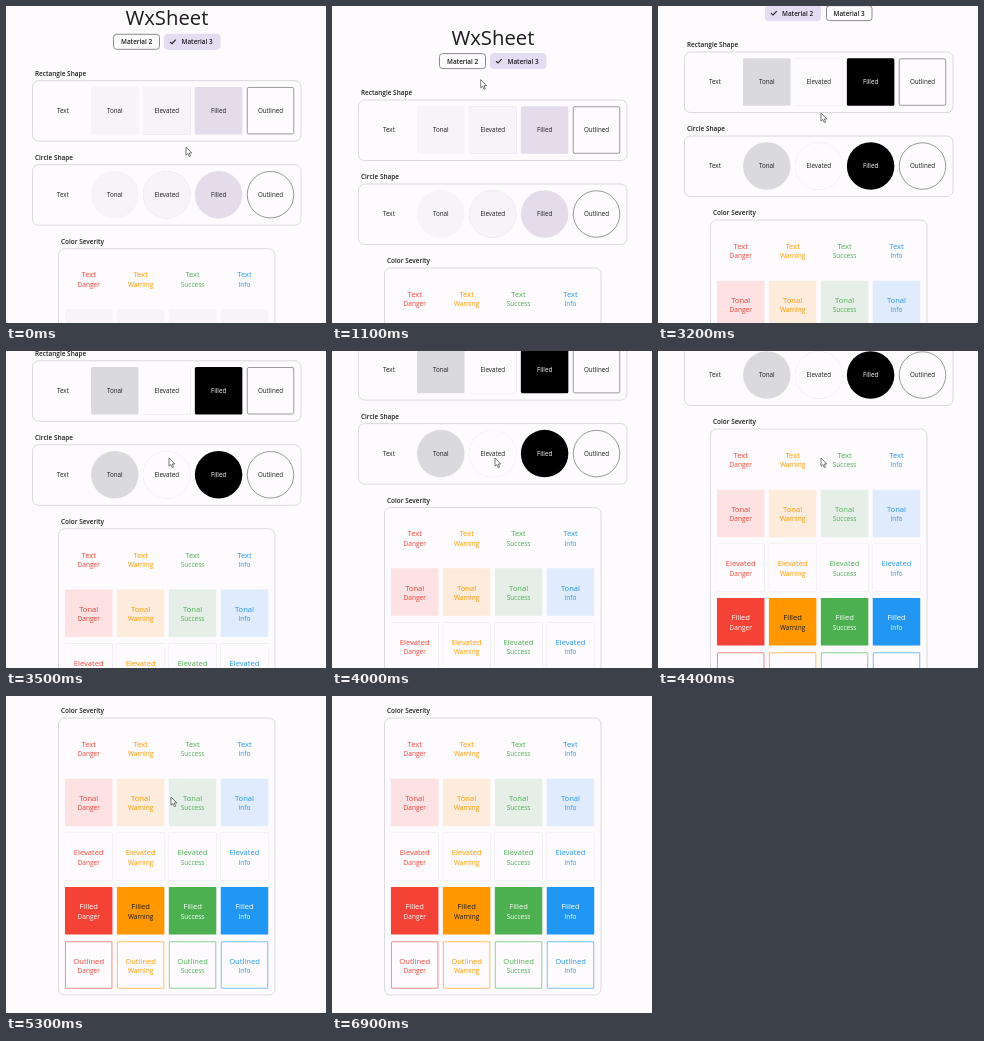
An HTML page that plays this animation: 320x317 px, repeating every 7.7 s.

```html
<!DOCTYPE html>
<html lang="en">
<head>
<meta charset="utf-8">
<title>WxSheet</title>
<style>
  html, body { margin: 0; width: 100%; height: 100%; overflow: hidden; background: #fdfbfe; }
  svg { display: block; width: 100%; height: 100%; font-family: "Open Sans", "Noto Sans", sans-serif; }
  .raised { filter: drop-shadow(0 .8px .5px #0003); }
  .outlined { stroke-opacity: .6; }
</style>
</head>
<body>
<svg id="stage" viewBox="0 0 320 317"></svg>
<script>
const LOOP = 7700, STEP = 100;
const INK = '#1c1b1f', PAGE = '#fdfbfe', LINE = '#5a575f', TONAL = '#f7f3f9';
const SIZE = 47.5;
const stage = document.getElementById('stage');

const clamp = x => Math.min(1, Math.max(0, x));
const lerp = (a, b, u) => a + (b - a) * u;
const span = (t, from, to) => clamp((t - from) / (to - from));
const smooth = u => u * u * (3 - 2 * u);
const decay = (t, k) => 1 - Math.exp(-t / k);

function mix(a, b, u) {
  const part = (c, i) => parseInt(c.slice(i, i + 2), 16);
  return `rgb(${[1, 3, 5].map(i => Math.round(lerp(part(a, i), part(b, i), u)))})`;
}

const text = (x, y, size, label, fill = INK, more = 'text-anchor="middle"') =>
  `<text x="${x}" y="${y}" font-size="${size}" fill="${fill}" ${more}>${label}</text>`;

const box = (x, y, w, h, r, fill, stroke = 'none', cls = '') =>
  `<rect x="${x}" y="${y}" width="${w}" height="${h}" rx="${r}" fill="${fill}" stroke="${stroke}" class="${cls}"/>`;

const panel = (x, y, w, h) => box(x, y, w, h, 6, 'none', '#dcd9df');

const heading = (x, y, label) => text(x, y, 6.45, label, INK, 'font-weight="600"');

// An outlined sheet keeps its stroke inside the edge.
function sheet(cx, cy, r, fill, stroke = 'none', cls = '') {
  const half = SIZE / 2 - (stroke === 'none' ? 0 : .5);
  return box(cx - half, cy - half, 2 * half, 2 * half, r, fill, stroke, cls);
}

function chip(x, right, label, selected, fill) {
  const look = selected ? [fill, fill] : [PAGE, '#8d8993'];
  const tick = selected
    ? `<path d="M${x + 6} 55.1l2 1.9 3.7-4" fill="none" stroke="${INK}" stroke-width="1.1"/>` : '';
  return box(x + .5, 47.6, right - x - 1, 15, 3, ...look) + tick +
    text(right - 23.4, 57.6, 6.4, label, INK, 'text-anchor="middle" font-weight="600"');
}

function shapes(cy, r, m) {
  const at = i => 56.9 + 51.9 * i;
  const looks = [
    ['none'],
    [mix(TONAL, '#dadadc', m)],
    [mix(TONAL, PAGE, m), 'none', 'raised'],
    [mix('#e4dcea', '#000000', m)],
    ['none', LINE, 'outlined']
  ];
  return ['Text', 'Tonal', 'Elevated', 'Filled', 'Outlined'].map((name, i) =>
    sheet(at(i), cy, r, ...looks[i]) +
    text(at(i), cy + 2.4, 6.25, name, i === 3 ? mix(INK, '#ffffff', m) : INK)).join('');
}

const severities = [
  ['Danger', '#f44336', '#fde1e3', '#ffffff'],
  ['Warning', '#ff9800', '#fdecdc', INK],
  ['Success', '#4caf50', '#e6efe7', '#ffffff'],
  ['Info', '#2196f3', '#e0ebfe', '#ffffff']
];

function severityGrid(m) {
  return severities.map(([name, color, tint, onColor], col) => {
    const cx = 82.7 + 51.93 * col;
    const rows = [
      ['Text', color, 'none'],
      ['Tonal', color, mix(TONAL, tint, m)],
      ['Elevated', color, PAGE, 'none', 'raised'],
      ['Filled', onColor, color],
      ['Outlined', color, 'none', color, 'outlined']
    ];
    return rows.map(([kind, ink, ...look], row) => {
      const cy = 292.2 + 54.2 * row;
      return sheet(cx, cy, .5, ...look) +
        text(cx, cy - 1.4, 7.6, kind, ink) + text(cx, cy + 8, 6.5, name, ink);
    }).join('');
  }).join('');
}

function scrollAt(t) {
  if (t < 3100) return 19.3 * (1 - smooth(span(t, 0, 400)));
  if (t < 3900) return 88 * decay(t - 3100, 127);
  if (t < 4000) return 88;
  if (t < 4400) return lerp(105.4, 184, span(t, 4000, 4400));
  return 184 + 56 * (t < 5300 ? decay(t - 4400, 220) : 1);
}

function pointerAt(t) {
  const move = (a, b, u) => [lerp(a[0], b[0], u), lerp(a[1], b[1], u)];
  const start = [180, 141], button = [141, 57], page = [163, 107], rest = [165, 101];
  if (t < 2400) return move(start, button, smooth(span(t, 600, 1300)));
  if (t < 4700) return move(button, page, smooth(span(t, 2400, 2700)));
  if (t < 6600) return move(page, rest, span(t, 4700, 5000));
  return t < 6900 ? move(rest, [303, 66], smooth(span(t, 6600, 6800))) : null;
}

function pointer(t) {
  const p = pointerAt(t);
  if (!p) return '';
  const hand = p[1] < 63;
  const d = hand
    ? 'M-1 1Q0-.2 1 1V4.6L4.4 5.4Q5.4 5.8 5.2 7L4.4 11H-.2L-3 7.4Q-2.6 6-1 7.2Z'
    : 'M0 0V8.2L1.9 6.5 3.3 9.7 4.6 9.1 3.2 6H5.8Z';
  return `<path transform="translate(${p})" d="${d}" fill="#fff" stroke="#444" stroke-width=".7" stroke-linejoin="round"/>`;
}

function draw(t) {
  const m = smooth(span(t, 1600, 2000));
  const second = t >= 1700;
  const lilac = '#e3dcf3';
  const pressed = second && t < 2500 ? mix(lilac, '#d6cbe5', span(t, 1600, 2000)) : lilac;
  stage.innerHTML = `<g transform="translate(0 ${-scrollAt(t)})">` +
    text(160.9, 38.5, 20.3, 'WxSheet') +
    chip(107, lerp(154, 163, m), 'Material 2', second, pressed) +
    chip(lerp(158, 168, m), 214.5, 'Material 3', !second, lilac) +
    heading(29, 89.2, 'Rectangle Shape') + panel(26.5, 94, 268.5, 60.5) + shapes(124, 1.5, m) +
    heading(29, 173.2, 'Circle Shape') + panel(26.5, 178, 268.5, 60.5) + shapes(208, SIZE / 2, m) +
    heading(55, 257.2, 'Color Severity') + panel(52.5, 262, 216.5, 277) + severityGrid(m) +
    '</g>' + pointer(t);
}

const begin = performance.now();
let shown = -1;
function tick(now) {
  const t = Math.floor(Math.max(0, now - begin) % LOOP / STEP) * STEP;
  if (t !== shown) draw(shown = t);
  requestAnimationFrame(tick);
}
tick(begin);
</script>
</body>
</html>
```
